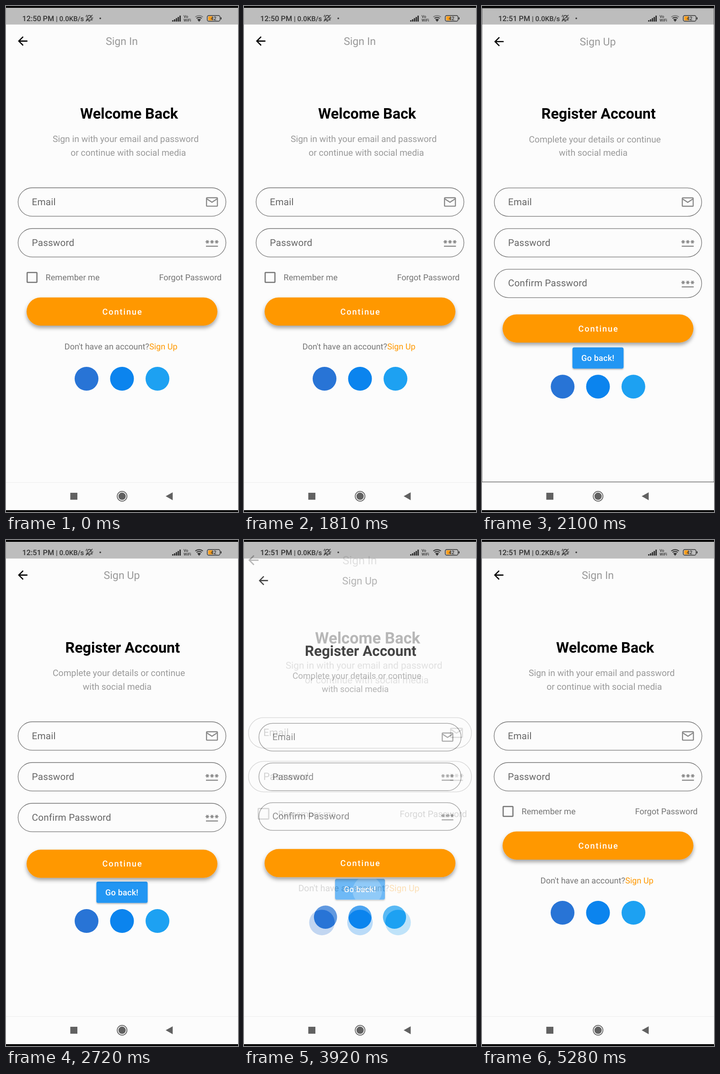
Write an HTML page that moves like this. It is 507x1105 px and loops after 5690 ms.

```html
<!DOCTYPE html>
<html lang="en">
<head>
<meta charset="utf-8">
<title>Sign in flow</title>
<style>
html, body { margin: 0; height: 100%; overflow: hidden; background: #000; }
svg { display: block; width: 100%; height: 100%; font-family: Roboto, sans-serif; text-rendering: geometricPrecision; }
.title { font-size: 23.24px; fill: #999; text-anchor: middle; }
.head { font-size: 32.27px; font-weight: 700; text-anchor: middle; }
.sub { font-size: 19.37px; fill: #999; }
.label { font-size: 20.66px; fill: #666; letter-spacing: .19px; }
.small { font-size: 18.1px; fill: #757575; }
.button { font-size: 18.07px; font-weight: 500; fill: #fff; }
.line { fill: none; stroke: #757575; stroke-width: 1.3; }
.icon { fill: none; stroke: #8a8a8a; stroke-width: 2.4; }
.status { fill: #333; font-weight: 500; }
.thin { fill: none; stroke: #333; stroke-width: 1.4; }
</style>
</head>
<body>
<svg viewBox="0 0 507 1105">
  <defs>
    <filter id="shadow" x="-10%" y="-30%" width="120%" height="180%">
      <feDropShadow dx="0" dy="5" stdDeviation="4" flood-opacity=".36"/>
    </filter>
    <filter id="low" x="-10%" y="-20%" width="120%" height="150%">
      <feDropShadow dx="0" dy="2" stdDeviation="1.5" flood-opacity=".3"/>
    </filter>
    <clipPath id="backClip"><rect x="197.5" y="746" width="112" height="46.5" rx="4"/></clipPath>
    <path id="star" d="M-4 0H4M-2-3.5L2 3.5M2-3.5L-2 3.5"/>
  </defs>
  <g id="signIn"></g>
  <rect id="scrim" y="4" width="507" height="1036"/>
  <g id="signUp"></g>
  <g id="hero">
    <rect x="45" y="636.5" width="417" height="61.5" rx="30.7" fill="#ff9800" filter="url(#shadow)"/>
    <text class="button" x="210.5" y="673.6" letter-spacing="1.94">Continue</text>
  </g>
  <g id="system">
    <rect y="4" width="507" height="36.5" opacity=".25"/>
    <g class="status">
      <text id="clock" x="35.5" y="32.6" font-size="16.2"></text>
      <text id="speed" x="109" y="32.6" font-size="15"></text>
      <circle cx="206" cy="27" r="1.8"/>
      <path id="bars"/>
      <text x="388" y="25.5" font-size="8.5">Vo</text>
      <text x="388" y="34" font-size="8.5">WiFi</text>
      <path d="M418 29.5Q422 26.5 426 29.5L422 34.5Z"/>
      <rect x="442" y="22.5" width="10" height="9" rx="1.5" fill="#ff9f1a"/>
      <rect x="469" y="24.5" width="2" height="5" rx="1"/>
      <text x="447.2" y="31" font-size="11">42</text>
    </g>
    <g class="thin">
      <path d="M176 30.5H188Q186 28.5 186 25Q186 20.5 182 20.5Q178 20.5 178 25Q178 28.5 176 30.5ZM180 33H184M174.5 33.5L189 19.5M175 24Q175 21 177 19.5M189.5 24.5Q189.5 27 188.5 28.5"/>
      <path d="M416.3 27Q422 22.8 427.7 27" stroke-width="2"/>
      <path id="wifi" d="M413.6 24Q422 17.8 430.4 24" stroke-width="2"/>
      <rect x="439.7" y="20.7" width="28" height="12.6" rx="3.6"/>
    </g>
    <rect y="1040" width="507" height="61" fill="#fcfcfc"/>
    <rect y="1040" width="507" height="1" fill="#ececec"/>
    <g fill="#616161">
      <rect x="140.5" y="1063" width="15.5" height="15.2"/>
      <circle cx="253.7" cy="1070.6" r="8"/>
      <circle cx="253.7" cy="1070.6" r="10.7" fill="none" stroke="#616161" stroke-width="1.7"/>
      <path d="M349 1070.6L364.3 1062V1079.2Z"/>
    </g>
    <path d="M0 0H507V4H0ZM0 1101H507V1105H0Z"/>
  </g>
</svg>
<script>
const LOOP = 5690, PUSH = 1897, POP = 3886, TAP = 3840, DURATION = 300;
const $ = id => document.getElementById(id);
const text = (cls, x, y, s, extra = '') => `<text class="${cls}" x="${x}" y="${y}" ${extra}>${s}</text>`;

const mailIcon = y => `<g class="icon"><rect x="438.2" y="${y - 9.3}" width="23.8" height="18.4" rx="1.4"/>
  <path d="M438.5 ${y - 7}L450.1 ${y + .6}L461.7 ${y - 7}"/></g>`;
const passIcon = y => `<g class="icon" stroke-width="2">` +
  [440, 450.2, 460.4].map(x => `<use href="#star" x="${x}" y="${y - 2}" style="stroke-width:1.9"/>`).join('') +
  `<path d="M437 ${y + 7.6}H463.2"/></g>`;
const field = (y, name, icon) =>
  `<rect class="line" x="26.4" y="${y - 31}" width="454.2" height="62.2" rx="31.1"/>` +
  text('label', 56.6, y + 6.6, name) + icon(y);

const page = (title, heading, headX, lines, body, socialY) =>
  `<rect y="4" width="507" height="1036" fill="#fcfcfc"/>
  <path transform="translate(21 61.1) scale(1.291)" d="M20 11H7.83l5.59-5.59L12 4l-8 8 8 8 1.41-1.41L7.83 13H20z"/>` +
  text('title', 253, 85.2, title) + text('head', headX, 245.8, heading) +
  lines.map(([x, s], i) => text('sub', x, 297 + 30 * i, s)).join('') +
  field(428, 'Email', mailIcon) + field(517, 'Password', passIcon) + body +
  ['#2874d6', '#0b84ee', '#1da1f2'].map((c, i) =>
    `<circle cx="${176 + 77.5 * i}" cy="${socialY}" r="26" fill="${c}"/>`).join('');

$('signIn').innerHTML = page('Sign In', 'Welcome Back', 269,
  [[102, 'Sign in with your email and password'], [141.2, 'or continue with social media']],
  `<rect class="line" x="46.2" y="582" width="21.4" height="21.4" rx="1" style="stroke-width:2.5"/>` +
  text('small', 86.6, 599, 'Remember me') + text('small', 334.4, 599, 'Forgot Password') +
  text('small', 127.8, 750, `Don't have an account?<tspan fill="#ff9800">Sign Up</tspan>`), 814);

$('signUp').innerHTML = page('Sign Up', 'Register Account', 254.8,
  [[102, 'Complete your details or continue'], [167.7, 'with social media']],
  field(606, 'Confirm Password', passIcon) +
  `<rect x="197.5" y="746" width="112" height="46.5" rx="4" fill="#2196f3" filter="url(#low)"/>
  <g clip-path="url(#backClip)" fill="#fff"><rect id="glow" x="197" y="746" width="113" height="47"/>
  <circle id="ripple" cx="270" cy="773" opacity=".24"/></g>` +
  text('button', 217, 775.6, 'Go back!', 'letter-spacing=".2"'), 832);

$('bars').setAttribute('d', [3, 5, 7.5, 10, 13].map((h, i) => `M${363 + 4 * i} 34v${-h}h3v${h}z`).join(''));

const ramp = (t, a, b) => Math.min(1, Math.max(0, (t - a) / (b - a)));

function bezier(x1, y1, x2, y2) {
  const at = (a, b, s) => 3 * a * s * (1 - s) ** 2 + 3 * b * s * s * (1 - s) + s ** 3;
  return x => {
    if (x <= 0 || x >= 1) return ramp(x, 0, 1);
    let lo = 0, hi = 1;
    for (let i = 0; i < 24; i++) {
      const mid = (lo + hi) / 2;
      if (at(x1, x2, mid) < x) lo = mid; else hi = mid;
    }
    return at(y1, y2, lo);
  };
}
const glide = bezier(.4, 0, .2, 1);
const zoomStart = bezier(.05, 0, .133333, .06), zoomEnd = bezier(.208333, .82, .25, 1);
const zoom = t => t < 1 / 6 ? .4 * zoomStart(6 * t) : .4 + .6 * zoomEnd((t - 1 / 6) * 1.2);

const scale = (id, k) =>
  $(id).setAttribute('transform', `translate(253.5 521.7) scale(${k}) translate(-253.5 -521.7)`);

function draw(t) {
  const push = ramp(t, PUSH, PUSH + DURATION), pop = ramp(t, POP, POP + DURATION);
  const back = pop > 0;
  scale('signIn', back ? 1.1 - .1 * zoom(pop) : 1 + .05 * zoom(push));
  scale('signUp', back ? 1 - .1 * zoom(pop) : .85 + .15 * zoom(push));
  $('signUp').setAttribute('opacity', back ? 1 - ramp(pop, .0825, .2075) : ramp(push, .125, .25));
  $('scrim').setAttribute('opacity', back ? 0 : .6 * ramp(push, .2075, .4175));
  $('hero').setAttribute('transform', `translate(0 ${39.8 * (back ? 1 - glide(pop) : glide(push))})`);

  const tapped = t >= TAP;
  $('ripple').setAttribute('r', tapped ? 8 + (t - TAP) * .31 : 0);
  $('glow').setAttribute('opacity', .1 * ramp(t, TAP, TAP + 80));

  $('clock').textContent = t < 2100 ? '12:50 PM' : '12:51 PM';
  $('speed').textContent = t < 4490 ? '| 0.0KB/s' : '| 0.2KB/s';
  $('wifi').setAttribute('stroke', t < 2720 ? '#777' : '#333');
}

const start = performance.now();
function tick() {
  draw((performance.now() - start) % LOOP);
  requestAnimationFrame(tick);
}
tick();
</script>
</body>
</html>
```
